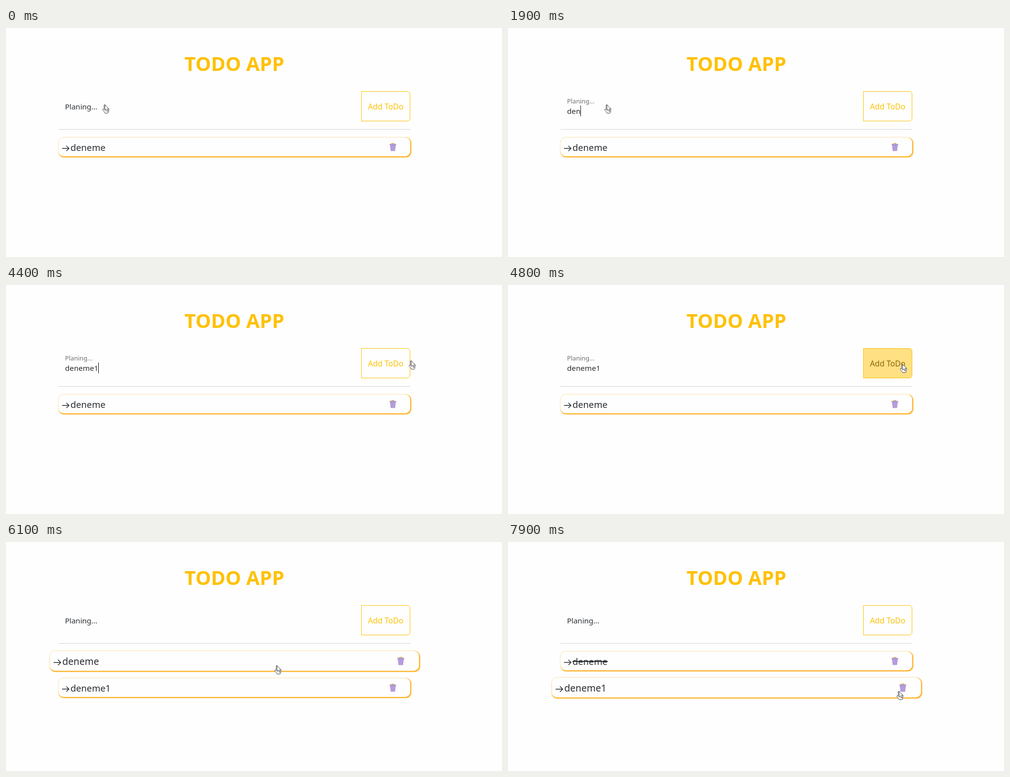
An HTML page that plays this animation: 1000x464 px, repeating every 8 s.

```html
<!DOCTYPE html>
<html lang="en">
<head>
<meta charset="utf-8">
<title>Todo app</title>
<style>
  :root { --amber: #ffc107; --ink: #2b2f33; }
  html, body { margin: 0; width: 100%; height: 100%; overflow: hidden; background: #fefefe; }
  body { position: relative; font: 15px "Noto Sans", "Open Sans", sans-serif; color: var(--ink); }
  body > * { position: absolute; box-sizing: border-box; }
  svg { display: block; overflow: visible; }

  /* every animation shares the 8 s loop; 1.25% is one 100 ms step */
  h1, .field, .label, .typed::after, .caret, .add, .item, .strike::after, .cursor, .cursor svg {
    animation: 8s step-end infinite;
  }

  h1 {
    left: 106px; top: 48px; width: 709px; margin: 0;
    font-size: 39.5px; font-weight: 600; line-height: 49px;
    text-align: center; color: var(--amber);
  }
  .field {
    left: 106px; top: 128px; width: 602px; height: 61px;
    border: 1px solid #3a3d40; border-radius: 6px 0 0 6px;
    animation-name: outline;
  }
  .label {
    left: 119px; top: 149px; line-height: 20px;
    transform-origin: 0 50%; animation-name: float;
  }
  .input { left: 119px; top: 157px; height: 22px; display: flex; align-items: center; font-size: 15.2px; }
  .typed::after { content: ""; animation-name: type; }
  .caret { width: 1px; height: 22px; background: #111; opacity: 0; animation-name: blink; }
  .add {
    left: 716px; top: 128px; width: 99px; height: 61px;
    border: 1px solid var(--amber); border-radius: 0 6px 6px 0;
    font-size: 15.7px; line-height: 60px; text-align: center; white-space: nowrap;
    color: var(--amber); animation-name: fill;
  }
  .rule { left: 106px; top: 205px; width: 709px; height: 1px; background: #d2d3d8; }

  .item {
    left: 106px; width: 709px; height: 38px; border-radius: 10px;
    background: #fefefe; box-shadow: 1px 1px 2px 1px orange;
    font-size: 18.3px; line-height: 39px;
  }
  .item span { position: absolute; left: 24px; }
  .item svg { position: absolute; }
  .arrow { left: 7px; top: 16px; fill: none; stroke: var(--ink); stroke-width: 1.4; }
  .bin { left: 667px; top: 10px; }
  .first { top: 222px; animation-name: hover1; }
  .second { top: 276px; animation-name: hover2; }
  .strike::after {
    content: ""; position: absolute; left: 0; right: 0; top: 19px; height: 2px;
    background: var(--ink); opacity: 0; animation-name: strike;
  }

  .cursor { left: 0; top: 0; animation-name: move; }
  .cursor svg { position: absolute; fill: #fff; stroke: #4a4a50; stroke-linejoin: round; }
  .hand { left: -5px; top: 0; animation-name: hand; }
  .point { left: 0; top: 0; animation-name: point; }

  @keyframes outline {
    0%, 10% { opacity: 0; animation-timing-function: steps(2); }
    12.5%, 13.75% { opacity: 1; animation-timing-function: steps(2); }
    16.25%, 100% { opacity: 0; }
  }
  @keyframes float {
    0%, 10% { transform: none; opacity: 1; animation-timing-function: steps(2); }
    12.5%, 63.75% { transform: translateY(-11.5px) scale(.85); opacity: .68; animation-timing-function: steps(2); }
    66.25%, 100% { transform: none; opacity: 1; }
  }
  @keyframes type {
    0% { content: ""; }
    17.5% { content: "d"; }
    21.25% { content: "de"; }
    23.75% { content: "den"; }
    25% { content: "dene"; }
    26.25% { content: "denem"; }
    28.75% { content: "deneme"; }
    38.75% { content: "deneme1"; }
    65%, 100% { content: ""; }
  }
  @keyframes blink {
    0%, 36.25%, 46.25%, 58.75%, 100% { opacity: 0; }
    11.25%, 38.75%, 52.5% { opacity: 1; }
  }
  @keyframes fill {
    0%, 58.75% { background: #ffc10700; color: var(--amber); animation-timing-function: steps(2); }
    61.25%, 68.75% { background: #ffc107; color: #111; animation-timing-function: steps(2); }
    71.25%, 100% { background: #ffc10700; color: var(--amber); }
  }
  @keyframes hover1 {
    0%, 73.75% { transform: scale(1); animation-timing-function: steps(2); }
    76.25%, 91.25% { transform: scale(1.05); animation-timing-function: steps(2); }
    93.75%, 100% { transform: scale(1); }
  }
  @keyframes hover2 {
    0% { opacity: 0; transform: scale(1); }
    65% { opacity: 1; transform: scale(1); }
    93.75% { opacity: 1; transform: scale(1); animation-timing-function: steps(2); }
    96.25%, 100% { opacity: 1; transform: scale(1.05); }
  }
  @keyframes strike {
    0% { opacity: 0; }
    86.25%, 100% { opacity: 1; }
  }
  @keyframes move {
    0%, 48.75% { transform: translate(199px, 155px); animation-timing-function: steps(5); }
    55% { transform: translate(816.5px, 153px); animation-timing-function: steps(2); }
    57.5% { transform: translate(854px, 158px); animation-timing-function: steps(2); }
    60%, 68.75% { transform: translate(795px, 160px); animation-timing-function: steps(6); }
    76.25%, 90% { transform: translate(546px, 250px); animation-timing-function: steps(7); }
    98.75%, 100% { transform: translate(788px, 302px); }
  }
  @keyframes hand {
    0%, 50%, 70% { opacity: 0; }
    11.25%, 60%, 98.75%, 100% { opacity: 1; }
  }
  @keyframes point {
    0%, 60%, 98.75%, 100% { opacity: 0; }
    50%, 70% { opacity: 1; }
  }
</style>
</head>
<body>
  <svg width="0" height="0">
    <symbol id="arrow" viewBox="0 0 15 12"><path d="M0 6H14M8.7 .7L14 6L8.7 11.3"/></symbol>
    <symbol id="bin" viewBox="0 0 14 18">
      <path d="M2 3.5L4 .8L6 2L8 .3L10 1.8L12 3.5Z" fill="#e9c35c"/>
      <path d="M5 3L6.5 1.5L8 3Z" fill="#8d8a94"/>
      <path d="M.3 3H13.7V5.2H12.9L11.4 17.2H2.6L1.1 5.2H.3Z" fill="#b39ddb"/>
      <path d="M1 5.2H13" stroke="#9a86c4" stroke-width=".7"/>
    </symbol>
  </svg>

  <h1>TODO APP</h1>
  <div class="field"></div>
  <div class="label">Planing...</div>
  <div class="input"><span class="typed"></span><i class="caret"></i></div>
  <div class="add">Add ToDo</div>
  <div class="rule"></div>

  <div class="item first">
    <svg class="arrow" width="15" height="12"><use href="#arrow"/></svg>
    <span class="strike">deneme</span>
    <svg class="bin" width="14" height="18"><use href="#bin"/></svg>
  </div>
  <div class="item second">
    <svg class="arrow" width="15" height="12"><use href="#arrow"/></svg>
    <span>deneme1</span>
    <svg class="bin" width="14" height="18"><use href="#bin"/></svg>
  </div>

  <div class="cursor">
    <svg class="hand" width="15" height="19"><path d="M3.7 10.5V1.8a1.3 1.3 0 0 1 2.6 0V7.2c.2-1 2.4-.9 2.5.3c.4-.8 2.3-.6 2.4.5c.6-.6 2.1-.3 2.1 1V12.5c0 2-1.3 3-1.5 5H5.5C5.2 15.5 2.5 13.5 1 11c-.7-1.3.9-2.4 1.9-1.3z"/></svg>
    <svg class="point" width="10" height="16"><path d="M.5 .5V12.2L3 9.8L4.9 14.2L6.8 13.4L5 9.1H8.6Z"/></svg>
  </div>
</body>
</html>
```
